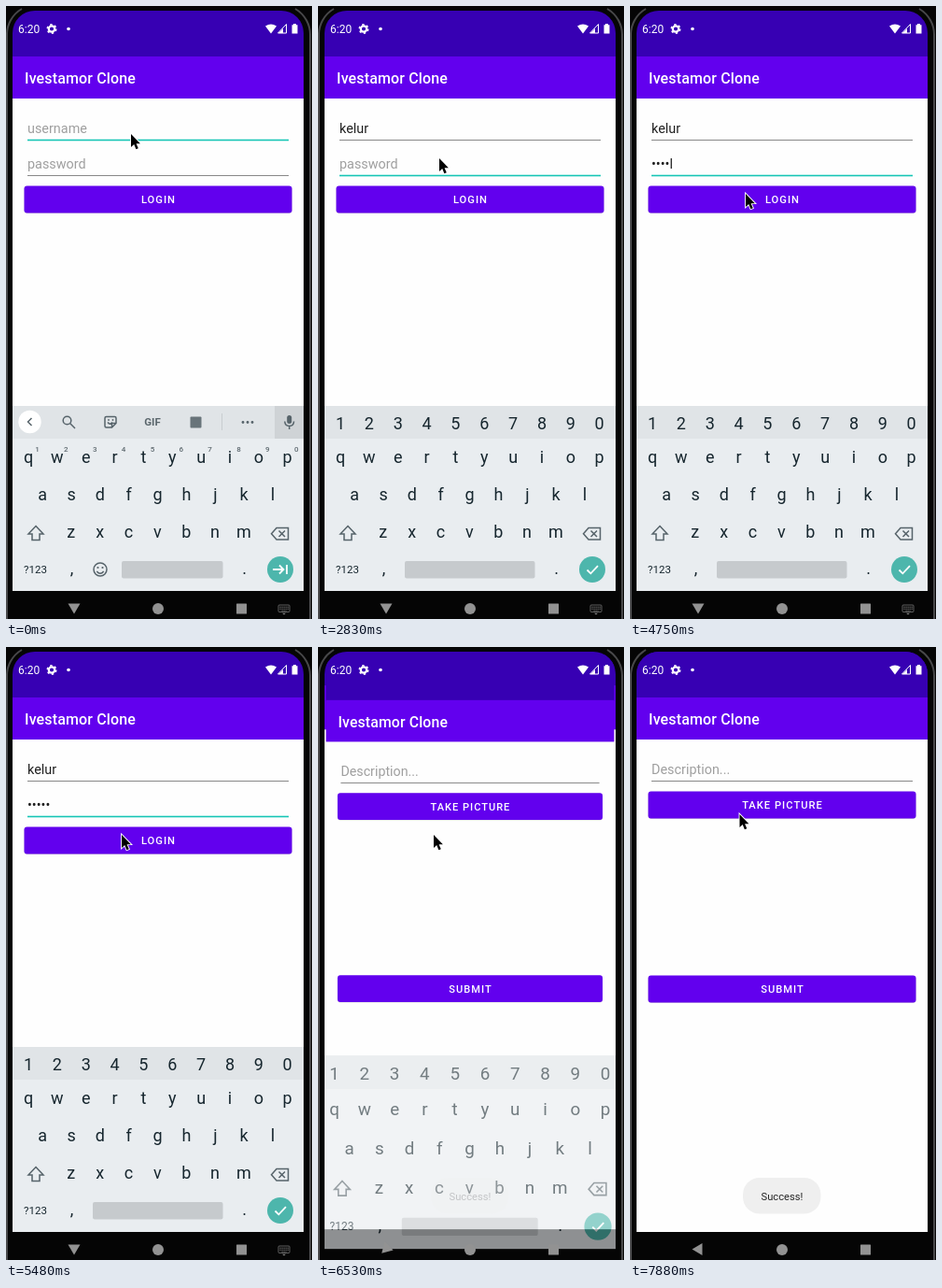
Animation, 328 px wide and 656 px high, one loop 8 s. Source, as an HTML page:

```html
<!DOCTYPE html>
<html lang="en">
<head>
<meta charset="utf-8">
<title>Login demo</title>
<style>
  html, body { margin: 0; width: 100%; height: 100%; overflow: hidden; background: #050505; }
  svg { display: block; width: 328px; height: 656px; }
  text { font: 14.4px Roboto, sans-serif; white-space: pre; }
  .title { font-weight: 500; font-size: 16px; letter-spacing: .13px; fill: #fff; }
  .btn { font-weight: 500; font-size: 11.2px; letter-spacing: 1px; fill: #fff; text-anchor: middle; }
  .hint { fill: #9f9f9f; }
  .typed { fill: #202020; }
  .key { font-size: 18px; fill: #16262e; text-anchor: middle; }
  .sup { font-size: 8px; font-weight: 500; fill: #5f6a70; text-anchor: middle; }
  .word { fill: #5a666c; text-anchor: middle; }
  .line { fill: none; stroke: #56636a; stroke-width: 1.5; }
  .grey { fill: #56636a; }
</style>
</head>
<body>
<svg viewBox="0 0 328 656">
  <defs>
    <clipPath id="screen"><path d="M7 656V29A24 24 0 0 1 31 5H295A24 24 0 0 1 319 29V656Z"/></clipPath>
    <clipPath id="btnClip"><rect x="19.5" y="192.5" width="287" height="29" rx="3"/></clipPath>
  </defs>

  <rect width="328" height="656" fill="#050505"/>
  <path d="M1 656V32A32 32 0 0 1 17 3M326 656V32A32 32 0 0 0 310 3" fill="none" stroke="#48484a" stroke-width="2"/>

  <g clip-path="url(#screen)">
    <g id="login"></g>
    <g id="post"></g>
    <rect id="nav" x="7" y="626" width="312" height="34" fill="#050505"/>
    <g id="board"></g>
    <g fill="#929292">
      <path id="back" d="M-6.5-5H6.5L0 6Z"/>
      <circle cx="163" cy="645" r="6"/>
      <rect x="247" y="639.5" width="11" height="11" rx=".5"/>
      <g id="ime" fill="none" stroke="#858585">
        <rect x="292" y="641" width="12" height="7.5" rx="1" stroke-width=".7"/>
        <path d="M293.5 643.2H303M293.5 645.2H303M295.5 647.2H300.5" stroke-dasharray="1.2 .8"/>
        <path d="M296 649.8H300L298 651.5Z" fill="#858585" stroke="none"/>
      </g>
    </g>
    <g id="toast">
      <rect x="121" y="568" width="83.5" height="38.5" rx="18" fill="#efefef"/>
      <text x="163" y="592" text-anchor="middle" style="font-size:11.2px" fill="#262626">Success!</text>
    </g>
    <g fill="#fff">
      <text x="13" y="29" style="font-size:12px">6:20</text>
      <circle cx="49" cy="24.5" r="3.2" fill="none" stroke="#fff" stroke-width="2.2"/>
      <circle cx="49" cy="24.5" r="4.7" fill="none" stroke="#fff" stroke-width="1.6" stroke-dasharray="2.4 2.52"/>
      <circle cx="67" cy="24.5" r="1.8"/>
      <path d="M278 21.5Q284 17.5 290 21.5L284 29.5Z"/>
      <path d="M300.5 19.5V29H291.5Z" fill="none" stroke="#fff"/>
      <path d="M297 24V29H292Z"/>
      <path d="M306.5 20.2H308V19H311V20.2H312.5V29.5H306.5Z"/>
    </g>
  </g>

  <path id="mouse" d="M0 0V14L3.2 11.1L5.4 16.2L7.8 15.2L5.6 10.2H9.9Z" fill="#000"
    stroke="#fff" stroke-width="1.8" paint-order="stroke"/>
</svg>

<script>
const LOOP = 8000;
const KEY = 30.85;
const $ = id => document.getElementById(id);
const set = (id, attrs) => { for (const k in attrs) $(id).setAttribute(k, attrs[k]); };
const show = (id, on) => { $(id).style.display = on ? '' : 'none'; };

// Markup helpers
const text = (cls, x, y, s, extra = '') => `<text class="${cls}" x="${x}" y="${y}" ${extra}>${s}</text>`;
const rect = (x, y, w, h, fill, extra = '') =>
  `<rect x="${x}" y="${y}" width="${w}" height="${h}" fill="${fill}" ${extra}/>`;
const line = d => `<path class="line" d="${d}"/>`;
const button = (y, label) =>
  rect(19.5, y + .6, 287, 29, '#000', 'rx="3" opacity=".15"') +
  rect(19.5, y, 287, 29, '#6200ee', 'rx="3"') + text('btn', 163.5, y + 18.8, label);
const page = () =>
  rect(7, 5, 312, 50, '#3700b3') + rect(7, 99, 312, 527, '#fefefe') +
  rect(7, 54, 312, 45, '#6200ee') + text('title', 20, 83, 'Ivestamor Clone');
const row = (chars, x, y) =>
  [...chars].map((c, i) => text('key', x + i * KEY, y, c)).join('');

$('login').innerHTML = page() +
  text('hint', 23, 136, 'username', 'id="userHint"') + text('typed', 23, 136, '', 'id="user"') +
  text('hint', 23, 174, 'password', 'id="passHint"') + text('typed', 23, 174, '', 'id="pass"') +
  rect(23, 143, 280, 1, '#888', 'id="userLine"') + rect(23, 181, 280, 1, '#888', 'id="passLine"') +
  rect(23, 137.6, 0, 1, '#333', 'id="compose"') + rect(23, 121, 1.7, 19.5, '#03c9b7', 'id="caret"') +
  button(192.5, 'LOGIN') +
  '<g clip-path="url(#btnClip)"><circle id="ripple" cx="124" cy="203" r="0" fill="#fff"/></g>';

$('post').innerHTML = page() +
  text('hint', 23, 136, 'Description...') + rect(23, 143, 280, 1, '#888') +
  button(154.4, 'TAKE PICTURE') + button(351.4, 'SUBMIT');

const mic = rect(288, 428, 31, 35, '#cfd3d6') +
  '<rect class="grey" x="301.2" y="438" width="5" height="9" rx="2.5"/>' +
  line('M298.8 444.5Q299 449.5 303.7 449.5Q308.4 449.5 308.6 444.5M303.7 449.5V453');
const chevron = d => `<circle cx="25.5" cy="445" r="12.2" fill="#fff"/>${line(d)}`;

const tools = chevron('M27.5 441L23.5 445L27.5 449') +
  '<circle class="line" cx="65.5" cy="443.5" r="4.3"/>' + line('M68.8 446.8L74 452') +
  line('M107.5 439.5H116.5Q118 439.5 118 441V446.5L113.5 451H107.5Q106 451 106 449.5V441Q106 439.5 107.5 439.5ZM118 446.5H113.5V451M109 445.5Q111.5 449 114 445.5') +
  '<circle class="grey" cx="110" cy="443" r=".9"/><circle class="grey" cx="114.5" cy="443" r=".9"/>' +
  text('word', 157, 449, 'GIF', 'style="font-size:11.5px;font-weight:700"') +
  rect(197.5, 439.5, 12, 12, '#68747a', 'rx="1"') + rect(231, 436, 1, 18, '#c8cdd0') +
  [254, 259, 264].map(x => `<circle class="grey" cx="${x}" cy="445.5" r="1.4"/>`).join('') + mic;

const words = chevron('M23.5 441L27.5 445L23.5 449') +
  [76.5, 162, 247].map((x, i) => text('word', x, 451, '', `id="word${i}"`)).join('') +
  rect(117, 436, 1, 19, '#c8cdd0') + rect(207, 436, 1, 19, '#c8cdd0') + mic;

$('board').innerHTML =
  rect(7, 463, 312, 163, '#e9edf0') + rect(7, 428, 312, 35, '#e0e4e7') +
  `<g id="tools">${tools}</g><g id="words">${words}</g>` +
  `<g id="digits">${row('1234567890', 24, 452.5)}</g>` +
  `<g id="sups">${[...'1234567890'].map((c, i) => text('sup', 33.5 + i * KEY, 476.5, c)).join('')}</g>` +
  row('qwertyuiop', 24, 489) + row('asdfghjkl', 39.2, 529) + row('zxcvbnm', 69.8, 569) +
  line('M32 556.5L40 565H36V571.5H28V565H24Z') +
  line('M290 558.5H302.5V571H290L284.5 564.8ZM292.5 561.5L299 568M299 561.5L292.5 568') +
  text('key', 31.5, 607, '?123', 'style="font-size:11.5px"') +
  text('key', 70.5, 608, ',') + text('key', 255.5, 608, '.') +
  '<g id="smile"><circle class="line" cx="101" cy="603" r="7"/>' + line('M97.3 605Q101 609.5 104.7 605') +
  '<circle class="grey" cx="98.5" cy="601" r="1.1"/><circle class="grey" cx="103.5" cy="601" r="1.1"/></g>' +
  rect(124, 594, 108.5, 18.5, '#c6cacd', 'id="space" rx="2"') +
  '<circle cx="294" cy="603" r="14" fill="#4db6ac"/>' +
  '<path id="enter" fill="none" stroke="#fff" stroke-width="1.8"/>';

// Each step overrides the state before it. press: [radius, opacity].
// zoom: [login scale, post scale, post alpha, board scale, board alpha, board dy, toast alpha, back angle]
const base = {
  user: '', pass: '', words: '', focus: 0, caret: 0, digits: 0, compose: 1,
  mouse: [134, 137], press: [0, 0], zoom: [1, 1, 0, 1, 1, 0, 0, 0]
};
const steps = [
  [0, {}],
  [290, { user: 'k', caret: 1, words: 'k ok key' }],
  [740, { user: 'ke' }],
  [890, { words: 'ke key keep' }],
  [1030, { user: 'kel', words: 'kel Kelur kelp' }],
  [1330, { user: 'kelu', words: 'kelu Kelur Keru' }],
  [1480, { user: 'kelur', words: 'kelur Kelur Kelu' }],
  [1780, { mouse: [133, 146] }],
  [1930, { mouse: [131, 157] }],
  [2080, { mouse: [130, 163] }],
  [2230, { focus: 1, compose: 0, words: '' }],
  [2380, { digits: 1 }],
  [2830, { caret: 0 }],
  [3130, { pass: 'k', caret: 1 }],
  [3430, { pass: '•e' }],
  [3580, { pass: '••r' }],
  [3720, { pass: '•••u' }],
  [4020, { pass: '••••l' }],
  [4310, { mouse: [128, 174] }],
  [4460, { mouse: [125, 189] }],
  [4600, { mouse: [124, 199], caret: 0 }],
  [4750, { mouse: [124, 201] }],
  [5050, { caret: 1, press: [45, .16] }],
  [5200, { pass: '•••••', press: [130, .2] }],
  [5340, { press: [200, .1] }],
  [5480, { caret: 0, press: [0, 0] }],
  [6380, { zoom: [1.01, .93, .5, 1, 1, 0, 0, 0] }],
  [6530, { zoom: [1.045, .99, 1, 1.046, .6, 5, .22, 45] }],
  [6680, { zoom: [1.06, .999, 1, 1.05, .08, 6, .8, 85] }],
  [6830, { zoom: [1, 1, 1, 1, 0, 0, 1, 90] }],
  [7730, { mouse: [120, 186] }],
  [7880, { mouse: [117.5, 179] }]
];
let last = base;
const states = steps.map(([, change]) => (last = { ...last, ...change }));

const scale = (s, dy = 0) => `translate(163 ${340 + dy}) scale(${s}) translate(-163 -340)`;

function field(id, y, value, focused) {
  $(id).textContent = value;
  show(id + 'Hint', !value);
  set(id + 'Line', { y: focused ? y - .3 : y, height: focused ? 1.6 : 1, fill: focused ? '#16c5b5' : '#888' });
}

function draw(s) {
  field('user', 143, s.user, s.focus === 0);
  field('pass', 181, s.pass, s.focus === 1);
  const width = id => $(id).textContent ? $(id).getComputedTextLength() : 0;
  set('compose', { width: s.compose ? width('user') : 0 });
  set('caret', {
    x: 23 + width(s.focus ? 'pass' : 'user'), y: s.focus ? 158.5 : 121, opacity: s.caret
  });
  set('ripple', { r: s.press[0], opacity: s.press[1] });

  show('tools', !s.words && !s.digits);
  show('words', s.words);
  show('digits', s.digits);
  show('sups', !s.digits);
  show('smile', !s.digits);
  (s.words || '  ').split(' ').forEach((w, i) => { $('word' + i).textContent = w; });
  set('space', s.digits ? { x: 93, width: 139.5 } : { x: 124, width: 108.5 });
  set('enter', {
    d: s.digits ? 'M288.5 603.5L292.3 607.3L300 599.2' : 'M286 603H297.5M293 598.5L297.5 603L293 607.5M301 598V608'
  });

  const [login, post, postAlpha, board, boardAlpha, dy, toast, angle] = s.zoom;
  set('login', { transform: scale(login) });
  set('post', { transform: scale(post), opacity: postAlpha });
  set('board', { transform: scale(board, dy), opacity: boardAlpha });
  set('nav', { y: board > 1 ? 340 + 286 * post : 626 });
  set('toast', { opacity: toast });
  set('ime', { opacity: boardAlpha === 1 ? 1 : 0 });
  set('back', { transform: `translate(${angle ? 72.5 : 73} 644.5) rotate(${angle})` });
  set('mouse', { transform: `translate(${s.mouse})` });
}

let shown = -1;
function tick() {
  const t = performance.now() % LOOP;
  let i = steps.length - 1;
  while (steps[i][0] > t) i--;
  if (i !== shown) draw(states[shown = i]);
  requestAnimationFrame(tick);
}
tick();
</script>
</body>
</html>
```
